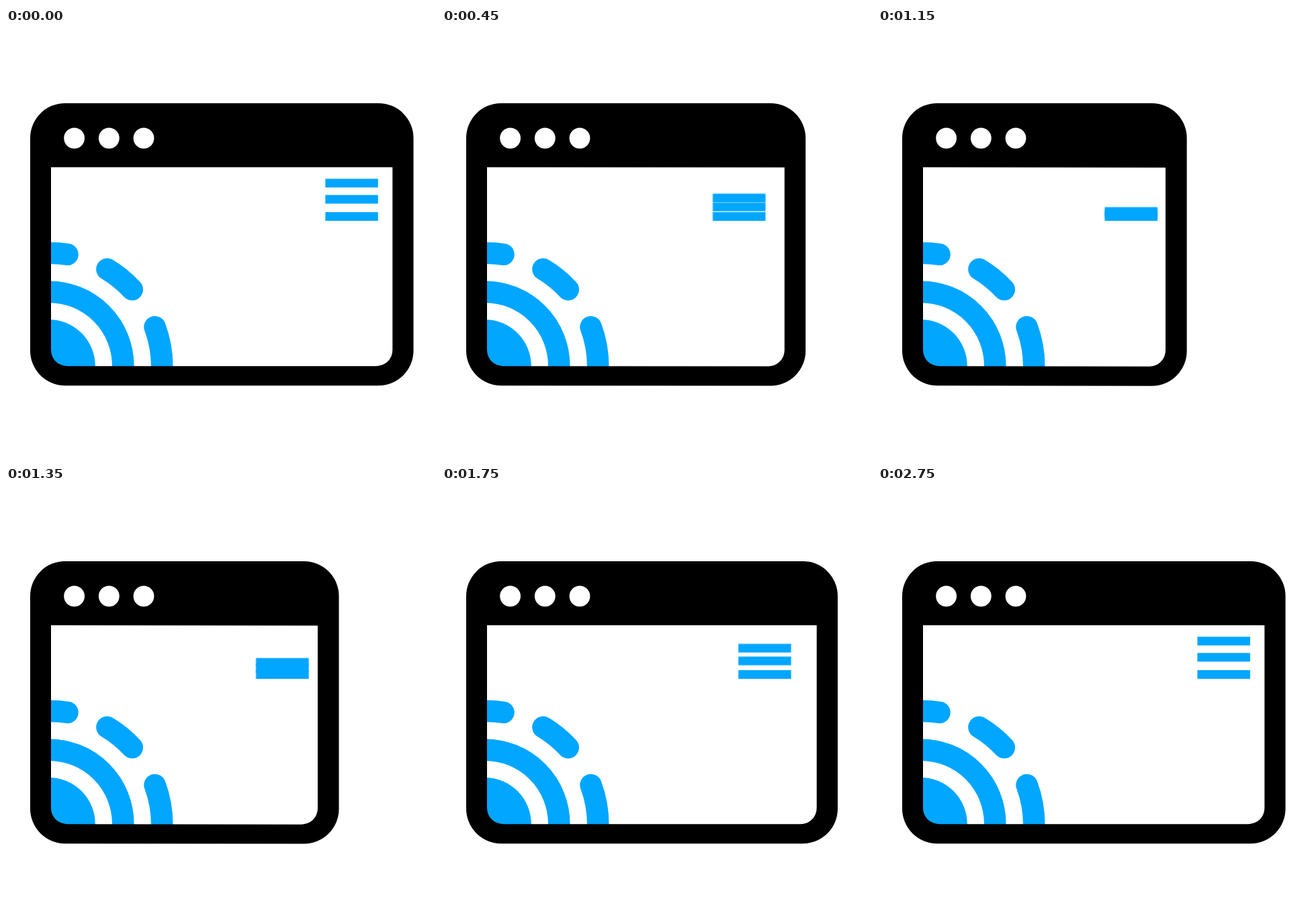
Animation of 640x640 px, one loop 3000 ms. Source, as an HTML page:

```html
<!DOCTYPE html>
<html lang="en">
<head>
<meta charset="utf-8">
<title>Responsive browser window</title>
<style>
  html, body { margin: 0; width: 100%; height: 100%; overflow: hidden; background: #fff; }
  svg { display: block; width: 100vw; height: 100vh; }

  .blue { fill: #00a6ff; }
  .rings { fill: none; stroke: #00a6ff; stroke-width: 32.6; }
  .dash { stroke-linecap: round; }
  .dots { fill: #fff; }

  .frame {
    fill-rule: evenodd;
    animation: resize 3s infinite;
  }
  .bar { animation: fold 3s linear infinite; }
  .top { --drop: 49.7px; }
  .mid { --drop: 25.5px; }
  .low { --drop: 0px; }

  /* The right side slides in, then back out, then rests. */
  @keyframes resize {
    0% {
      d: path("M88 111.9H554.5A52 52 0 0 1 606.5 163.9V480.2A52 52 0 0 1 554.5 532.2L88 532.2A52 52 0 0 1 36 480.2V163.9A52 52 0 0 1 88 111.9ZM67 207.3V479.2A24 24 0 0 0 91 503.2L551.3 503.2A24 24 0 0 0 575.3 479.2V207.3Z");
      animation-timing-function: cubic-bezier(.35, .04, .65, .96);
    }
    33.667% {
      d: path("M88 111.9H399.5A52 52 0 0 1 451.5 164.4V480.7A52 52 0 0 1 399.5 532.7L88 532.2A52 52 0 0 1 36 480.2V163.9A52 52 0 0 1 88 111.9ZM67 207.3V479.2A24 24 0 0 0 91 503.2L395.8 503.9A24 24 0 0 0 419.8 479.9V207.8Z");
      animation-timing-function: cubic-bezier(.37, 0, .63, 1);
    }
    65.333%, 100% {
      d: path("M88 111.9H554.5A52 52 0 0 1 606.5 163.9V480.2A52 52 0 0 1 554.5 532.2L88 532.2A52 52 0 0 1 36 480.2V163.9A52 52 0 0 1 88 111.9ZM67 207.3V479.2A24 24 0 0 0 91 503.2L551.3 503.2A24 24 0 0 0 575.3 479.2V207.3Z");
    }
  }

  /* The menu bars collapse onto the lowest one. */
  @keyframes fold {
    0%, 65%, 100% { transform: translate(0, 0); }
    33.667% { transform: translate(-162.2px, var(--drop)); }
  }
</style>
</head>
<body>
<svg viewBox="0 0 640 640">
  <path class="blue" d="M64 503V434A69 69 0 0 1 132.8 503V504H64Z"/>
  <g class="rings">
    <path d="M64 392.7A110.3 110.3 0 0 1 174.3 503V505"/>
    <g class="dash">
      <path d="M64 335A168.2 168.2 0 0 1 91.5 337"/>
      <path d="M150.5 359A168.2 168.2 0 0 1 187.7 389.2"/>
      <path d="M221.6 445A168.2 168.2 0 0 1 232.2 503"/>
    </g>
  </g>
  <g class="blue">
    <rect class="bar top" x="475.4" y="224.4" width="78.5" height="12.9"/>
    <rect class="bar mid" x="475.4" y="248.5" width="78.5" height="12.9"/>
    <rect class="bar low" x="475.4" y="274.1" width="78.5" height="12.9"/>
  </g>
  <path class="frame" d="M88 111.9H554.5A52 52 0 0 1 606.5 163.9V480.2A52 52 0 0 1 554.5 532.2L88 532.2A52 52 0 0 1 36 480.2V163.9A52 52 0 0 1 88 111.9ZM67 207.3V479.2A24 24 0 0 0 91 503.2L551.3 503.2A24 24 0 0 0 575.3 479.2V207.3Z"/>
  <g class="dots">
    <circle cx="101.6" cy="164" r="15.4"/>
    <circle cx="153.3" cy="164" r="15.4"/>
    <circle cx="205" cy="164" r="15.4"/>
  </g>
</svg>
</body>
</html>
```
